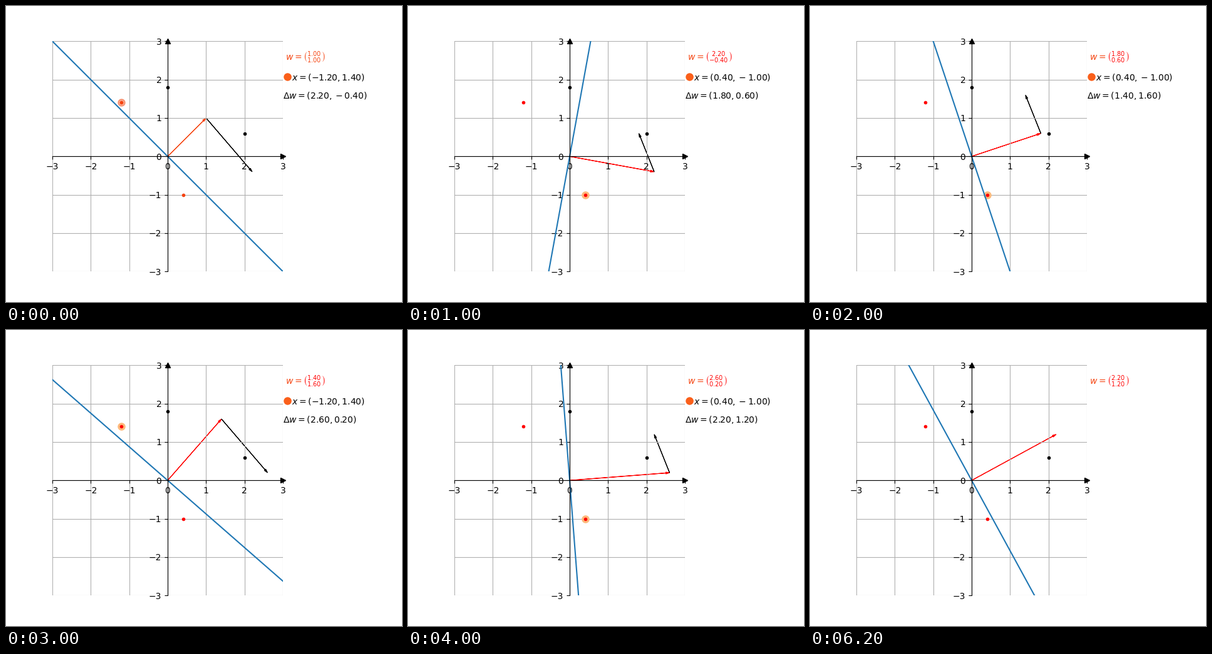
A matplotlib script for the animation above (7000 ms loop, 632 px wide and 473 px high).

```python
import numpy as np
import matplotlib.pyplot as plt
from matplotlib.animation import FuncAnimation

W, H, DPI = 632, 473, 100
LEFT, TOP, SIDE = 74, 56.33, 368
LIM = 3
POSITIVE = np.array([[0, 1.8], [2, 0.6]])
NEGATIVE = np.array([[-1.2, 1.4], [0.4, -1.0]])
ORANGE, RED, ORANGE_RED = "#fa5f1a", "#ff0000", "#f5430f"
STEP_MS, STEPS = 1000, 7

plt.rcParams["font.family"] = "DejaVu Sans"
fig = plt.figure(figsize=(W / DPI, H / DPI), dpi=DPI, facecolor="white")
ax = fig.add_axes([LEFT / W, 1 - (TOP + SIDE) / H, SIDE / W, SIDE / H])


def perceptron():
    """Yield (weights, misclassified point or None) until nothing is wrong."""
    w = np.array([1.0, 1.0])
    while True:
        wrong = [x for x in NEGATIVE if w @ x > 0]
        wrong += [-x for x in POSITIVE if w @ x < 0]
        if not wrong:
            yield w, None
            return
        yield w, wrong[0]
        w = w - wrong[0]


def setup_axes():
    ax.set(xlim=(-LIM, LIM), ylim=(-LIM, LIM))
    ticks = range(-LIM, LIM + 1)
    ax.set_xticks(ticks)
    ax.set_yticks(ticks)
    ax.grid(True)
    ax.spines[["left", "bottom"]].set_position("zero")
    ax.spines[["right", "top"]].set_visible(False)
    ax.plot(LIM, 0, ">k", clip_on=False)
    ax.plot(0, LIM, "^k", clip_on=False)


def label(x, y, color="black"):
    """Text whose baseline starts at pixel (x, y) from the top left."""
    return fig.text(x / W, 1 - y / H, "", color=color, fontsize=10)


def arrow(color):
    return ax.arrow(0, 0, 1, 1, color=color, lw=0.8, width=0.001,
                    head_width=0.05, head_length=0.1,
                    length_includes_head=True)


def pair(v):
    return f"({v[0]:.2f},{v[1]:.2f})"


setup_axes()
states = list(perceptron())
halo, = ax.plot([], [], "o", ms=8, zorder=1.9)
border, = ax.plot([], [], color="C0")
ax.plot(*POSITIVE.T, "k.")
dots, = ax.plot(*NEGATIVE.T, ".")
key, = ax.plot((449 - LEFT) / SIDE, 1 - (113 - TOP) / SIDE, "o", ms=8,
               color=ORANGE, transform=ax.transAxes, clip_on=False)
w_arrow, step_arrow = arrow(RED), arrow("black")
w_name = label(446, 86, ORANGE_RED)
w_value = label(474, 86)
x_label = label(456, 119)
step_label = label(442.5, 148)
w_name.set_text("$w=$")


def draw(i):
    n = min(i, len(states) - 1)
    w, x = states[n]
    red = RED if n else ORANGE_RED

    normal = np.array([-w[1], w[0]])
    ends = np.outer([-9, 9], normal)
    border.set_data(ends[:, 0], ends[:, 1])
    w_arrow.set_data(dx=w[0], dy=w[1])
    w_arrow.set_color(red)
    dots.set_color(red)
    w_value.set_color(red)
    w_value.set_text(rf"$\binom{{{w[0]:.2f}}}{{{w[1]:.2f}}}$")

    active = x is not None
    for item in (halo, key, step_arrow, x_label, step_label):
        item.set_visible(active)
    if active:
        new = w - x
        halo.set_data([x[0]], [x[1]])
        halo.set_color("#fdba7c" if n else "#f5521e")
        halo.set_alpha(1 if n else 0.5)
        step_arrow.set_data(x=w[0], y=w[1], dx=-x[0], dy=-x[1])
        x_label.set_text(f"$x={pair(x)}$")
        step_label.set_text(rf"$\Delta w={pair(new)}$")
    return []


anim = FuncAnimation(fig, draw, frames=STEPS, interval=STEP_MS,
                     init_func=lambda: draw(0), repeat=True, repeat_delay=0)
plt.show()
```
